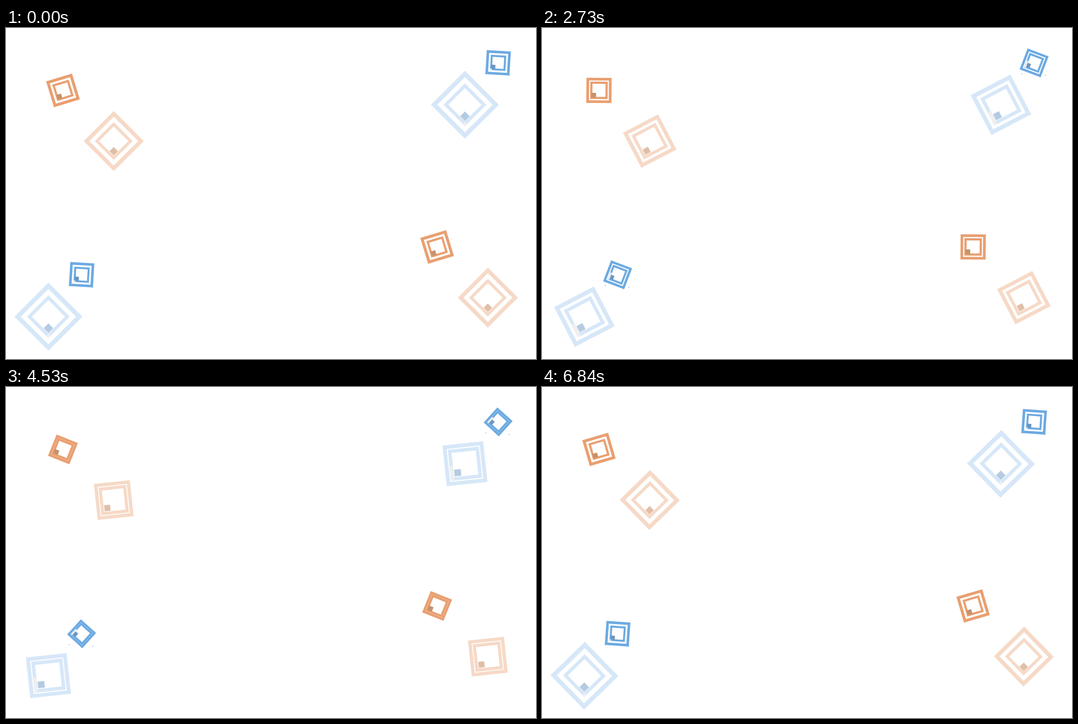
Write an HTML page without scripts that moves like this. It is 947 px wide and 592 px high and loops after 6870 ms.

```html
<!DOCTYPE html>
<html lang="en">
<head>
<meta charset="utf-8">
<title>Swinging squares</title>
<style>
  @property --t {
    syntax: "<number>";
    inherits: true;
    initial-value: -0.01;
  }

  html, body {
    margin: 0;
    width: 100%;
    height: 100%;
    overflow: hidden;
    background: #fff;
  }

  /* --t counts swings; --p is 1 when open and 0 when closed */
  svg {
    display: block;
    width: 947px;
    height: 592px;
    --p: calc(0.5 + 0.5 * cos(var(--t) * 1turn));
    --side: clamp(0, 1000 * sin(var(--t) * 1turn), 1);
    animation: swing 6870ms infinite;
  }

  @keyframes swing {
    0%     { --t: -0.01; animation-timing-function: steps(19); }
    8.18%  { --t: 1.56;  animation-timing-function: steps(34); }
    23.03% { --t: 4.16;  animation-timing-function: steps(38); }
    39.62% { --t: 7.786; animation-timing-function: steps(46); }
    59.71% { --t: 11.49; animation-timing-function: steps(56); }
    84.16% { --t: 16.01; animation-timing-function: steps(35); }
    99.45% { --t: 18.96; animation-timing-function: steps(1); }
    100%   { --t: 18.99; }
  }

  .turn  { transform: rotate(calc(var(--r) - 45deg * var(--p))); }
  .outer { transform: scale(calc(0.826 + 0.174 * var(--p))); }
  .inner { transform: scale(calc(1.04 - 0.04 * var(--p))); }
  .glint {
    fill: #efeff1;
    transform: rotate(calc(180deg * var(--side))) translateY(27px)
               scaleY(clamp(0.2, 5 * (1 - var(--p)), 1));
  }
  .ring  { fill: none; stroke: var(--c); }
  .core  { fill: var(--k); }

  .paleblue   { --c: #d6e7f8; --k: #b5cbe1; --r: 0deg; }
  .blue       { --c: #6caae2; --k: #6c96c0; --r: 48.3deg; }
  .paleorange { --c: #f6d9c7; --k: #dfbfa9; --r: 0deg; }
  .orange     { --c: #e99f70; --k: #c4936d; --r: 28deg; }
</style>
</head>
<body>
<svg viewBox="0 0 947 592" xmlns="http://www.w3.org/2000/svg">
  <defs>
    <rect id="glint" class="glint" x="-27.5" y="-26" width="6" height="26"/>
    <g id="big">
      <g class="outer">
        <rect class="ring" x="-39" y="-39" width="78" height="78" stroke-width="8"/>
      </g>
      <g class="inner">
        <rect class="ring" x="-24" y="-24" width="48" height="48" stroke-width="6"/>
      </g>
      <rect class="core" x="-20.5" y="8.5" width="12" height="12"/>
    </g>
    <g id="small">
      <g class="outer">
        <rect class="ring" x="-38.5" y="-38.5" width="77" height="77" stroke-width="9.2"/>
      </g>
      <g class="inner">
        <rect class="ring" x="-24" y="-24" width="48" height="48" stroke-width="7"/>
      </g>
      <rect class="core" x="-24" y="8" width="15" height="15"/>
    </g>

    <g id="bluepair">
      <path d="M36.5 -55.5h1.5M78.5 -52.5h1.5" stroke="#7d9cbb" stroke-width="1.2"/>
      <g class="paleblue">
        <g class="turn"><use href="#big"/><use href="#glint"/></g>
      </g>
      <g class="blue" transform="translate(59.3 -75) scale(.5)">
        <g class="turn"><use href="#small"/><use href="#glint"/></g>
      </g>
    </g>
    <g id="orangepair">
      <g class="paleorange" transform="scale(.884)">
        <g class="turn"><use href="#big"/></g>
      </g>
      <g class="orange" transform="translate(-90.7 -90.6) scale(.56)">
        <g class="turn"><use href="#small"/></g>
      </g>
    </g>
  </defs>

  <use href="#bluepair" x="820" y="137.3"/>
  <use href="#bluepair" x="75.8" y="516.3"/>
  <use href="#orangepair" x="192.5" y="202.2"/>
  <use href="#orangepair" x="861" y="482.2"/>
</svg>
</body>
</html>
```
